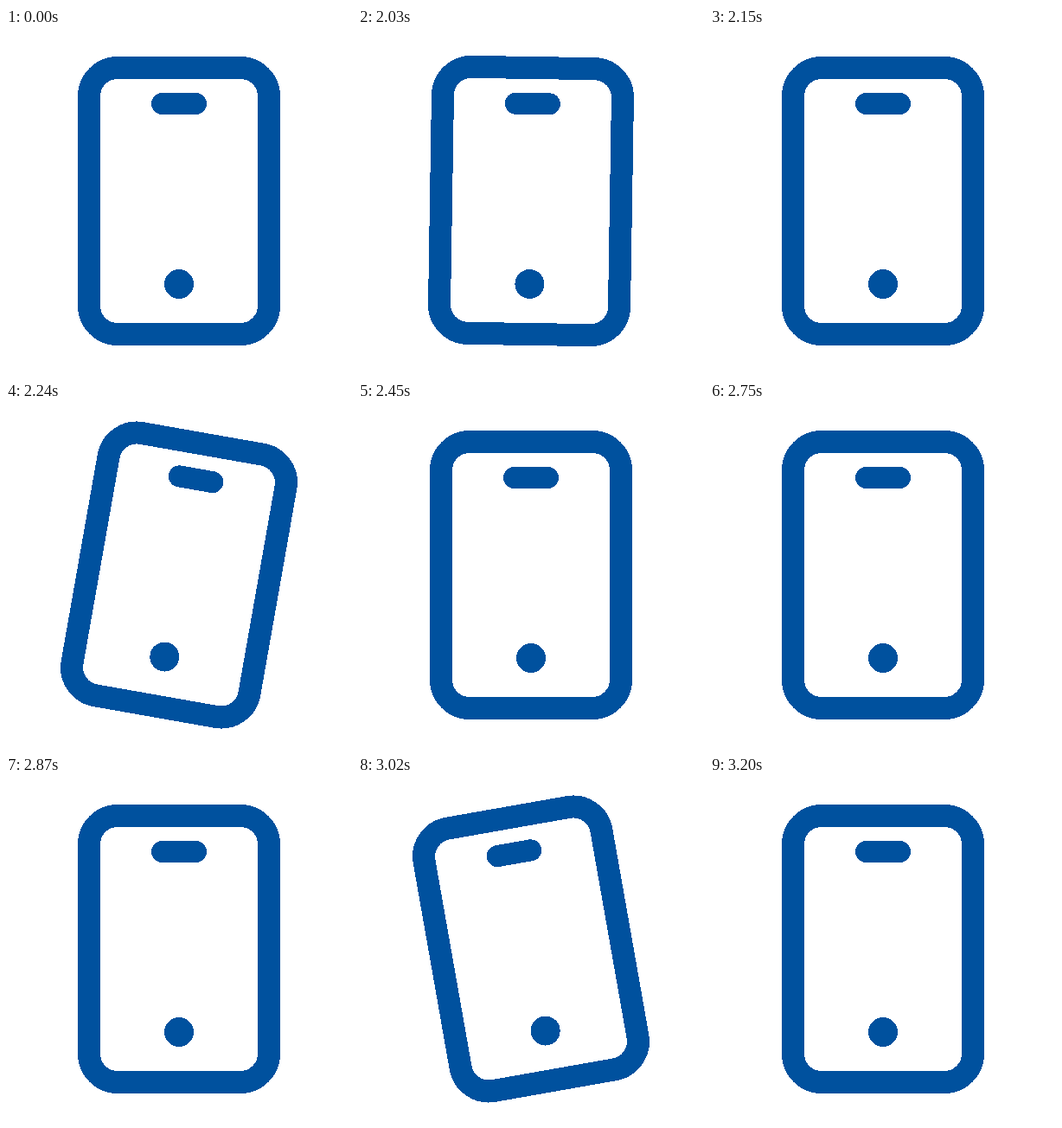
An HTML page for the animation above (3.23 s loop, 400 by 400 pixels).

```html
<!DOCTYPE html>
<html lang="en">
<head>
<meta charset="utf-8">
<title>Ringing phone</title>
<style>
  html, body {
    margin: 0;
    width: 100%;
    height: 100%;
    overflow: hidden;
    background: #fff;
  }

  svg {
    display: block;
    width: 100%;
    height: 100%;
    fill: #00519e;
    shape-rendering: crispEdges;
  }

  .body {
    fill: none;
    stroke: #00519e;
    stroke-width: 26;
  }
</style>
</head>
<body>
<svg viewBox="0 0 400 400">
  <g id="phone">
    <rect class="body" x="96" y="46" width="208" height="308" rx="33"/>
    <rect x="168" y="75" width="64" height="25" rx="12.5"/>
    <circle cx="200" cy="296" r="17"/>
  </g>
</svg>
<script>
  const LOOP = 3230, REST = 2000, STEP = 30;
  const WIDE = 30, SMALL = 10;  // degrees
  const RISE = 4, END = 40;     // steps

  const phone = document.getElementById("phone");
  const easeInOut = x => x < 0.5 ? 8 * x ** 4 : 1 - 8 * (1 - x) ** 4;

  // Eased tilt, then a quick shake that settles to a small swing.
  function angle(step) {
    if (step <= 0 || step >= END) return 0;
    if (step < RISE) return WIDE * easeInOut(step / RISE);
    const swing = Math.max(SMALL, WIDE - 5 * (step - RISE));
    return swing * Math.cos(step * Math.PI / 2);
  }

  function draw() {
    const t = performance.now() % LOOP;
    const step = Math.floor((t - REST) / STEP);
    phone.setAttribute("transform", `rotate(${angle(step).toFixed(3)} 200 200)`);
    requestAnimationFrame(draw);
  }

  draw();
</script>
</body>
</html>
```
